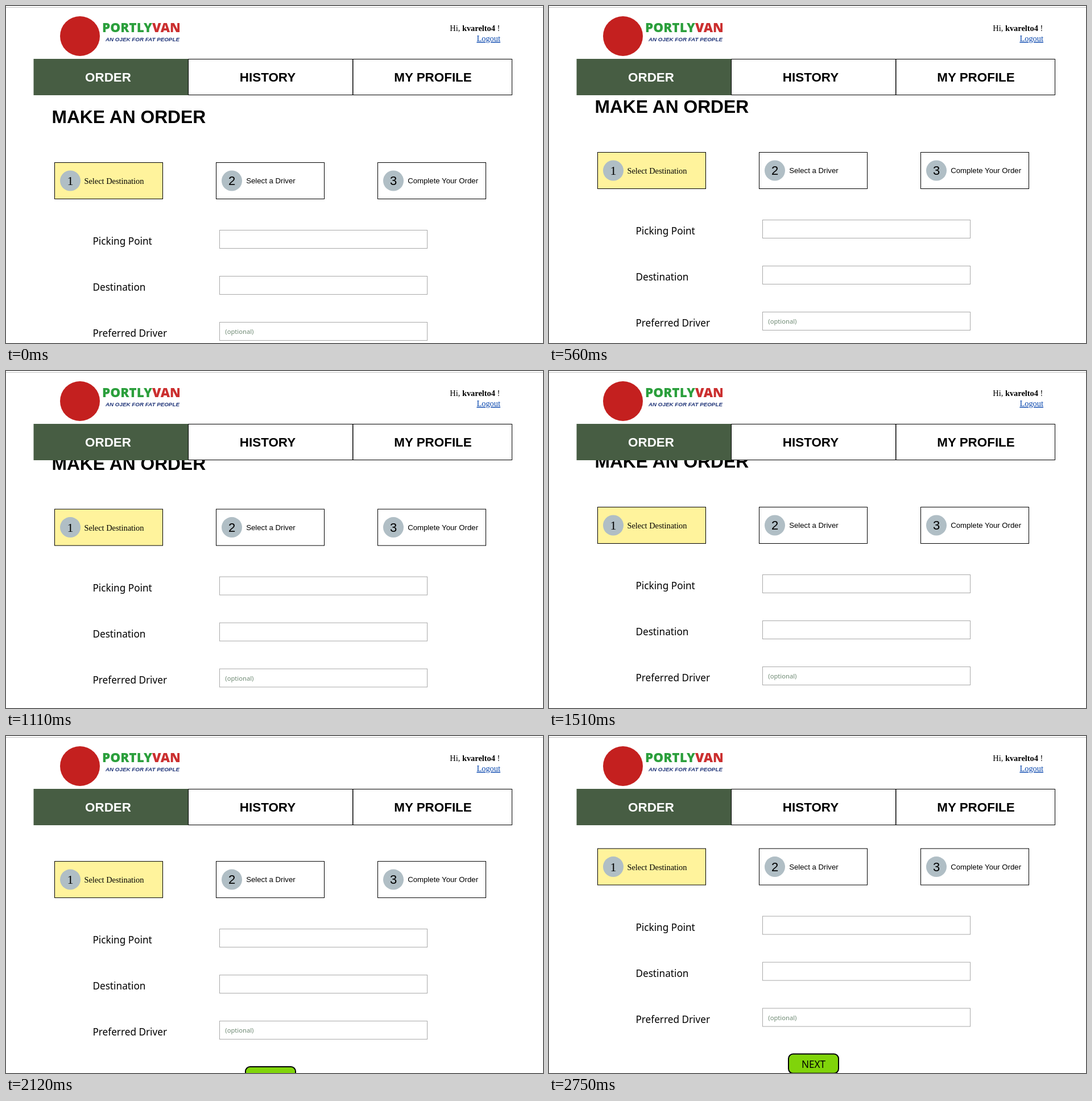
These frames come from a looping animation (944 by 593 pixels, 2830 ms). An HTML page:

```html
<!DOCTYPE html>
<html lang="en">
<head>
<meta charset="utf-8">
<title>Make an order</title>
<style>
  html, body { margin: 0; width: 100%; height: 100%; overflow: hidden; background: #fff; }
  svg { display: block; width: 100%; height: 100%; }
  .sans { font-family: "Liberation Sans", Arial, sans-serif; }
  .serif { font: 14.4px "Liberation Serif", "Times New Roman", serif; }
  .label { font: 17.2px "Noto Sans", sans-serif; }
  .hint { font: 11.2px "Noto Sans", sans-serif; fill: #6f8a74; }
  .nav { font-size: 22.4px; font-weight: bold; text-anchor: middle; }
  .brand { font: 800 22.5px "Open Sans", sans-serif; }
  .box { fill: #fff; stroke: #000; }
  .input { fill: #fff; stroke: #a9a9a9; }
  .num { font-size: 22px; text-anchor: middle; }
</style>
</head>
<body>
<svg viewBox="0 0 944 593">
  <g id="page">
    <text class="sans" x="80.4" y="206" font-size="31.8" font-weight="bold">MAKE AN ORDER</text>
    <g id="steps"></g>
    <g id="fields"></g>
    <text class="hint" x="385.3" y="577">(optional)</text>
    <rect x="421" y="637" width="88" height="34" rx="8" fill="#80d40a" stroke="#000" stroke-width="2"/>
    <text class="label" x="465" y="661" text-anchor="middle">NEXT</text>
  </g>

  <rect width="944" height="157" fill="#fff"/>
  <rect y="2" width="944" height="1" fill="#c4c4c4"/>
  <circle cx="130" cy="53" r="35" fill="#c4201f"/>
  <text class="brand" x="169" y="45.5" fill="#2b9f3c">PORTLY<tspan fill="#cb2f2f">VAN</tspan></text>
  <text class="sans" x="175" y="61.5" font-size="9.8" font-weight="bold" font-style="italic" fill="#1f3478">AN OJEK FOR FAT PEOPLE</text>
  <text class="serif" x="780.3" y="44">Hi, <tspan font-weight="bold">kvarelto4</tspan> !</text>
  <text class="serif" x="869" y="62" text-anchor="end" fill="#0645ad" text-decoration="underline">Logout</text>

  <rect x="48.5" y="93" width="272" height="64" fill="#475d43"/>
  <rect class="box" x="320.5" y="93.5" width="289" height="63"/>
  <rect class="box" x="610" y="93.5" width="279.5" height="63"/>
  <g class="sans nav">
    <text x="179.5" y="133" fill="#fff">ORDER</text>
    <text x="460" y="133">HISTORY</text>
    <text x="750.5" y="133">MY PROFILE</text>
  </g>
</svg>
<script>
const LOOP = 2830;
const ZOOM = .9;
const $ = id => document.getElementById(id);

$("steps").innerHTML = ["Select Destination", "Select a Driver", "Complete Your Order"].map((name, i) => {
  const x = 85 + 284 * i, active = i === 0, font = active ? "serif" : "sans";
  return `<rect class="box" x="${x + .5}" y="275.5" width="190" height="64" ${active ? 'style="fill:#fff39c"' : ""}/>
    <circle cx="${x + 28}" cy="307.5" r="18" fill="#b0bec5"/>
    <text class="${font} num" style="font-size:22px" x="${x + 28}" y="315">${i + 1}</text>
    <text class="${font}" style="font-size:${active ? 14.4 : 13.2}px" x="${x + (active ? 52.4 : 53.2)}" y="${active ? 313 : 312}">${name}</text>`;
}).join("");

$("fields").innerHTML = ["Picking Point", "Destination", "Preferred Driver"].map((name, i) =>
  `<text class="label" x="152.4" y="${420 + 81 * i}">${name}</text>
   <rect class="input" x="375.5" y="${394.5 + 81 * i}" width="365" height="32"/>`
).join("");

// The page scrolls in small jumps, at these times (ms).
const ticks = [0, 90, 170, 250, 320, 400, 480, 560, 640, 720, 800, 870, 960, 1110, 1270, 1420,
  1510, 1580, 1660, 1740, 1810, 1890, 1970, 2050, 2130, 2210, 2290, 2370, 2450, 2520, 2600, 2680, 2750];
// Scroll distance at key times: [ms, page px before zoom].
const keys = [[0, 0], [560, 20], [870, 29], [960, 33], [1110, 36], [1510, 40],
  [1890, 56], [2370, 71], [2450, 74], [2750, 86]];

function scrollAt(t) {
  const tick = ticks.findLast(v => v <= t);
  const i = Math.max(1, keys.findIndex(k => k[0] >= tick));
  const [t0, y0] = keys[i - 1], [t1, y1] = keys[i];
  return ZOOM * Math.round(y0 + (y1 - y0) * (tick - t0) / (t1 - t0));
}

const start = performance.now();
function draw() {
  const t = (performance.now() - start) % LOOP;
  $("page").setAttribute("transform", `translate(0 ${-scrollAt(t)})`);
  requestAnimationFrame(draw);
}
draw();
</script>
</body>
</html>
```
